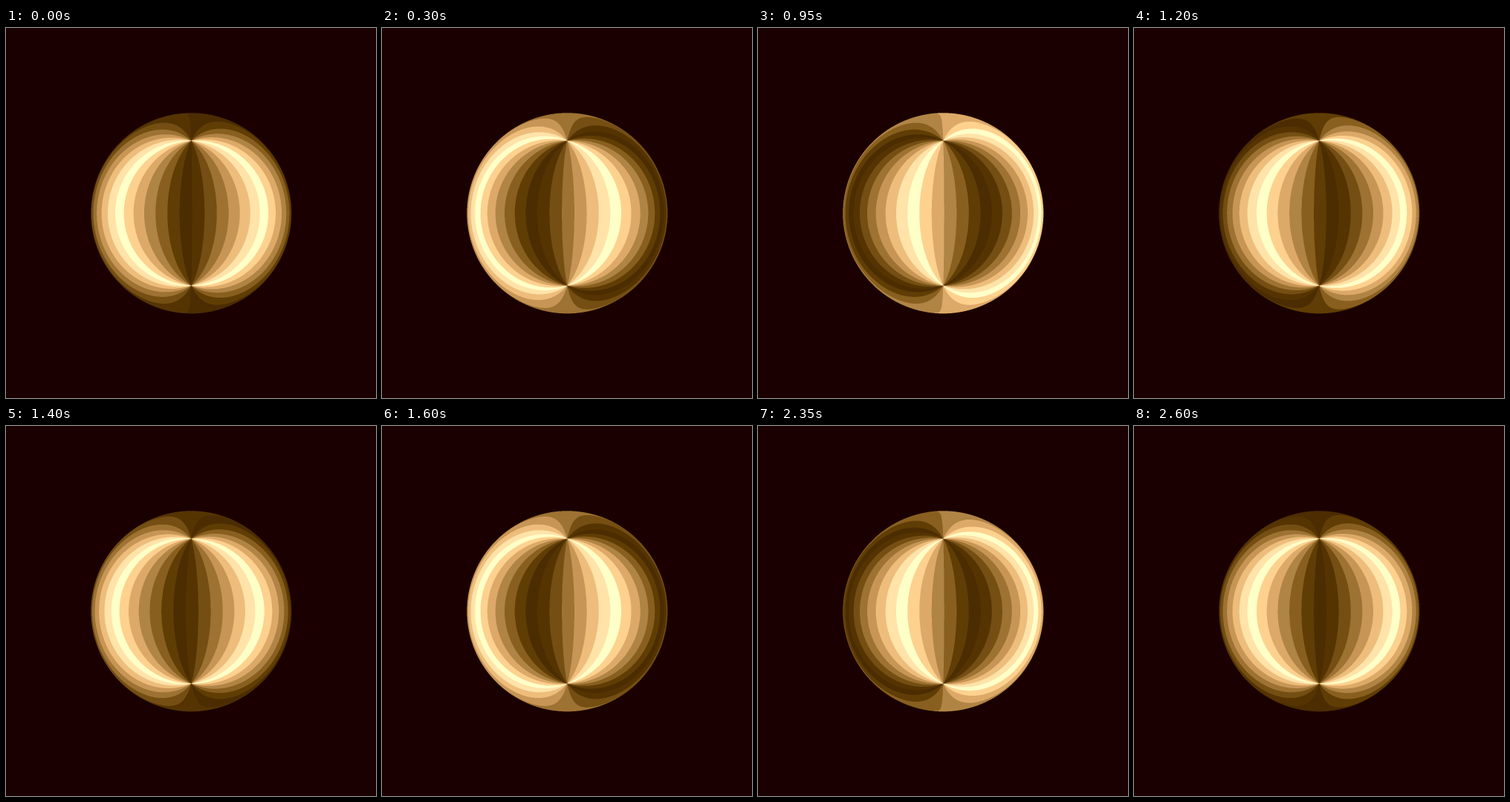
These frames come from a looping animation (498 by 498 pixels, 2650 ms). An HTML page with a canvas:

```html
<!DOCTYPE html>
<html lang="en">
<head>
<meta charset="utf-8">
<title>Mirror ball</title>
<style>
  html, body { margin: 0; width: 100%; height: 100%; overflow: hidden; background: #1a0000; }
  canvas { display: block; }
</style>
</head>
<body>
<canvas id="stage" width="498" height="498"></canvas>
<script>
const BACKGROUND = [26, 0, 0];
const STEP_MS = 50, STEPS = 53;
const CENTER = 249.3, RADIUS = 135;
const LEFT = 112, SIZE = 275;
const EYE = 16;             // eye distance in ball radii
const STRIPES = 26, CYCLE = STRIPES / 2;
const STRIPE = 2 * Math.PI / STRIPES;
const EDGE_SHIFT = 1 * Math.PI / 180;
const SAMPLES = 3;

const RAMP = [
  [0, 72, 40, 0], [0.19, 94, 60, 4], [0.35, 138, 96, 32], [0.5, 176, 132, 68],
  [0.65, 220, 168, 104], [0.81, 255, 210, 144], [0.9, 255, 230, 174], [0.96, 255, 255, 200]
];

function rampColor(t) {
  const i = Math.max(1, RAMP.findIndex(stop => stop[0] >= t));
  const a = RAMP[i - 1], b = RAMP[i];
  const k = (t - a[0]) / (b[0] - a[0]);
  return [1, 2, 3].map(c => a[c] + (b[c] - a[c]) * k);
}

// Thirteen shades per half turn, the peak lying a quarter stripe off centre.
const shades = Array.from({ length: CYCLE }, (_, i) => {
  const distance = Math.abs(i - CYCLE / 2 + 0.75);
  const nearest = Math.min(distance, CYCLE - distance);
  return rampColor(Math.min(0.96, 1 - nearest / (CYCLE / 2)));
});

// Longitude, in stripes, of the direction mirrored at a point of the disc.
function mirroredLongitude(x, y) {
  const rho = Math.hypot(x, y);
  if (rho >= 1) return NaN;
  const spread = Math.atan(rho * Math.tan(Math.asin(1 / EYE)));
  const angle = 2 * Math.asin(Math.min(1, EYE * Math.sin(spread))) - spread;
  const side = rho ? Math.sin(angle) * x / rho : 0;
  return (Math.atan2(side, Math.cos(angle)) - EDGE_SHIFT) / STRIPE;
}

const perPixel = SAMPLES * SAMPLES;
const longitudes = new Float32Array(SIZE * SIZE * perPixel);
let slot = 0;
for (let py = 0; py < SIZE; py++)
  for (let px = 0; px < SIZE; px++)
    for (let s = 0; s < perPixel; s++) {
      const x = LEFT + px + (s % SAMPLES + 0.5) / SAMPLES - CENTER;
      const y = LEFT + py + (Math.floor(s / SAMPLES) + 0.5) / SAMPLES - CENTER;
      longitudes[slot++] = mirroredLongitude(x / RADIUS, y / RADIUS);
    }

const ctx = document.getElementById('stage').getContext('2d');
const image = ctx.createImageData(SIZE, SIZE);
ctx.fillStyle = `rgb(${BACKGROUND})`;
ctx.fillRect(0, 0, 498, 498);

function draw(step) {
  const turn = Math.max(0, step - 1) / 2 + STRIPES;   // half a stripe per step
  const data = image.data;
  for (let p = 0, s = 0; p < data.length; p += 4) {
    let r = 0, g = 0, b = 0;
    for (let k = 0; k < perPixel; k++) {
      const longitude = longitudes[s++];
      const color = longitude === longitude
        ? shades[Math.floor(longitude + turn) % CYCLE] : BACKGROUND;
      r += color[0]; g += color[1]; b += color[2];
    }
    data[p] = r / perPixel;
    data[p + 1] = g / perPixel;
    data[p + 2] = b / perPixel;
    data[p + 3] = 255;
  }
  ctx.putImageData(image, LEFT, LEFT);
}

let shown = -1;
const start = performance.now();
function tick() {
  const step = Math.floor((performance.now() - start) / STEP_MS) % STEPS;
  if (step !== shown) draw(shown = step);
  requestAnimationFrame(tick);
}
tick();
</script>
</body>
</html>
```
